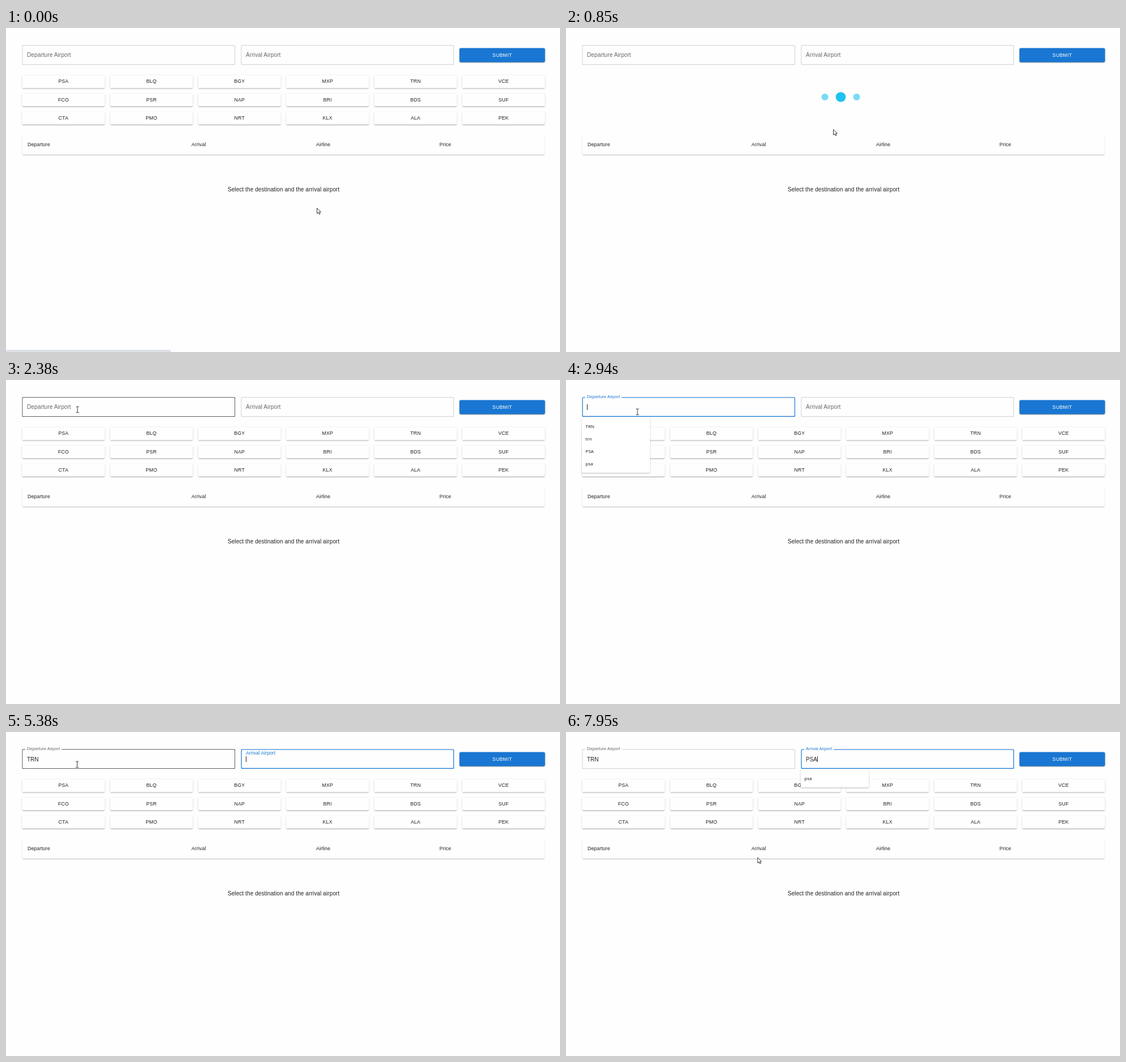
Animation, 977 px wide and 573 px high, one loop 8000 ms. Source, as an HTML page:

```html
<!DOCTYPE html>
<html lang="en">
<head>
<meta charset="utf-8">
<title>Flight search</title>
<style>
  html, body { margin: 0; width: 100%; height: 100%; overflow: hidden; background: #fefefe; }
  body { position: relative; font-family: "Liberation Sans", Arial, sans-serif; color: rgba(0,0,0,.87); }
  div, svg { position: absolute; box-sizing: border-box; }
  #page { inset: 0; }
  .text { line-height: 20px; white-space: pre; }
  .btn {
    height: 22.8px; border-radius: 2.5px; background: #fefefe;
    font-size: 8.75px; line-height: 23px; letter-spacing: .02857em; text-align: center;
    box-shadow: 0 1.9px .6px -1.25px rgba(0,0,0,.2), 0 1.25px 1.25px rgba(0,0,0,.14), 0 .6px 3.1px rgba(0,0,0,.12);
  }
  .submit { height: 25px; line-height: 25px; background: #1976d2; color: #fff; }
  .table {
    width: 922.3px; height: 36px; border-radius: 2.5px; background: #fefefe;
    box-shadow: 0 1.25px .6px -.6px rgba(0,0,0,.2), 0 .6px .6px rgba(0,0,0,.14), 0 .6px 1.9px rgba(0,0,0,.12);
  }
  .head { top: 196px; font-size: 8.75px; letter-spacing: .01071em; }
  .message { left: 0; top: 276px; width: 979px; text-align: center; font-size: 10px; letter-spacing: .00938em; }
  .frame { height: 34.8px; border-radius: 2.5px; }
  .label { padding: 0 3px; letter-spacing: .00938em; white-space: pre; transform: translateY(-50%); line-height: 1; }
  .value { top: 38px; height: 20px; display: flex; align-items: center; font-size: 10px; white-space: pre; }
  .value i { width: 1px; height: 10px; margin-right: -1px; background: #222; }
  .list {
    top: 66px; width: 119.5px; padding: 5px 6.3px; border-radius: 1px; background: #fff;
    font: 8px/22px "Open Sans", "Noto Sans", sans-serif; color: #111; white-space: pre-line;
    box-shadow: 0 1px 2.5px rgba(0,0,0,.28);
  }
  #status { left: -3px; top: 569px; width: 294px; height: 8px; border-radius: 3px; background: #dee1e6; }
  svg { left: 0; top: 0; overflow: visible; }
</style>
</head>
<body>
<div id="page"></div>
<div id="status"></div>
<svg id="cursor" width="20" height="20" fill="#fff" stroke="#222" stroke-width=".9" stroke-linejoin="round">
  <path data-kind="arrow" d="M.5.5V10.2L2.8 8.2L4.4 11.6L6 10.9L4.5 7.6H7.3Z"/>
  <path data-kind="hand" d="M2.6 9V1.6a1.1 1.1 0 0 1 2.2 0V5.2q1.2-.7 1.9.3q1.2-.5 1.8.5q1.5-.3 1.5 1.3V10.5q0 1.8-1.2 3V15H3.8V13.7L.4 9.5Q-.3 8 1.2 7.7Z"/>
  <path data-kind="beam" fill="none" d="M-2.5-5H-1Q0-5 0-4Q0-5 1-5H2.5M0-4V4.500M-2.5 5.5H-1Q0 5.5 0 4.5Q0 5.5 1 5.5H2.5"/>
</svg>
<script>
const LOOP = 8000;
const LEFT = 28.3;
const page = document.getElementById('page');
const status = document.getElementById('status');
const cursor = document.getElementById('cursor');

function add(parent, cls, style = {}, text = '') {
  const el = document.createElement('div');
  el.className = cls;
  el.textContent = text;
  Object.assign(el.style, style);
  parent.append(el);
  return el;
}
const px = n => n + 'px';
const show = (el, on) => { el.style.display = on ? '' : 'none'; };
// A transform keeps fractional edges soft instead of snapping them
const move = (x, y) => `translate(${x}px, ${y}px)`;
const box = (x, y, width) => ({ left: 0, top: 0, width: px(width), transform: move(x, y) });

// Static layout
const airports = 'PSA BLQ BGY MXP TRN VCE FCO PSR NAP BRI BDS SUF CTA PMO NRT KLX ALA PEK'.split(' ');
const grid = add(page, 'grid');
airports.forEach((code, i) =>
  add(grid, 'btn', box(LEFT + i % 6 * 155.25, 83.4 + Math.floor(i / 6) * 32.2, 146), code));
add(page, 'btn submit', box(799.6, 35.5, 151), 'SUBMIT');
add(page, 'table', box(LEFT, 188, 922.3));
[['Departure', 38], ['Arrival', 327], ['Airline', 547], ['Price', 764.5]].forEach(([name, x]) =>
  add(page, 'text head', { left: px(x) }, name));
add(page, 'text message', {}, 'Select the destination and the arrival airport');

// Three pulsing dots
const loader = add(page, 'loader');
loader.innerHTML = '<svg width="977" height="200" fill="#10bff0">' +
  [456.5, 484.5, 512.5].map(x => `<circle cx="${x}" cy="122"/>`).join('') + '</svg>';
const dots = [...loader.querySelectorAll('circle')];

function drawLoader(t) {
  const phase = ((t - 400) / 800 % 1 + 1) % 1;
  const low = 1 - Math.abs(2 * phase - 1);
  dots.forEach((dot, i) => {
    const k = i === 1 ? low : 1 - low;
    dot.setAttribute('r', (9 + 6 * k) * .622);
    dot.setAttribute('opacity', .5 + .5 * k);
  });
}

function makeField(x, width, name) {
  const frame = add(page, 'frame', box(x, 30.2, width));
  const label = add(page, 'label', { left: px(x + 5.7) }, name);
  const value = add(page, 'value', { left: px(x + 8.7) });
  const text = document.createElement('span');
  const caret = document.createElement('i');
  value.append(text, caret);
  const list = add(page, 'list', { left: px(x) });

  return s => {
    const edge = s.focus ? '#1976d2' : s.hover ? '#333' : '#c4c4c4';
    frame.style.boxShadow = `inset 0 0 0 ${s.focus ? 1.4 : 1}px ${edge}`;
    label.style.top = px(47.5 - 17.3 * s.float);
    label.style.fontSize = px(10 - 2.5 * s.float);
    label.style.color = s.focus ? '#1976d2' : 'rgba(0,0,0,.6)';
    label.style.background = s.float ? '#fefefe' : 'none';
    text.textContent = s.value;
    show(caret, s.caret);
    show(list, s.list);
    list.textContent = s.list.split(' ').join('\n');
  };
}
const drawDeparture = makeField(LEFT, 376.4, 'Departure Airport');
const drawArrival = makeField(414.3, 375.6, 'Arrival Airport');

// Steps: time, pointer x, y, kind, then what changes on the page, departure and arrival
const blank = { focus: 0, hover: 0, float: 0, value: '', caret: 0, list: '' };
const steps = [
  [0, 548, 318, 'arrow', { status: 1, page: 1, wait: 0 }, blank, blank],
  [290, 540, 300, 'arrow', { page: 0 }],
  [430, 520, 262, 'arrow', { page: 1, wait: 1, status: 0 }],
  [570, 500, 226, 'arrow'],
  [710, 483, 198, 'arrow'],
  [850, 471, 179, 'arrow'],
  [980, 268, 152, 'arrow'],
  [1110, 116, 131, 'hand', { wait: 0 }],
  [1390, 101, 130, 'hand'],
  [1540, 97, 129, 'hand'],
  [1690, 97, 126, 'hand'],
  [1820, 99, 118, 'hand'],
  [1960, 104, 98, 'hand'],
  [2100, 114, 72, 'arrow'],
  [2240, 123, 58, 'beam', {}, { hover: 1 }],
  [2380, 126, 52, 'beam'],
  [2660, 126, 55, 'beam', {}, { focus: 1, float: .6, caret: 1 }],
  [2800, 126, 56, 'beam', {}, { float: 1 }],
  [2940, 126, 56, 'beam', {}, { list: 'TRN trn PSA psa' }],
  [3370, 125.5, 57, 'beam', {}, { caret: 0 }],
  [3800, 125.5, 57, 'beam', {}, { caret: 1 }],
  [4240, 125.5, 57, 'beam', {}, { value: 'T', list: 'TRN trn' }],
  [4390, 125.5, 57, 'beam', {}, { value: 'TR' }],
  [4800, 125.5, 57, 'beam', {}, { value: 'TRN' }],
  [5380, 125.5, 57, 'beam', {}, { focus: 0, caret: 0, list: '' }, { focus: 1, float: .6, caret: 1 }],
  [5530, 125.5, 57, 'beam', {}, {}, { float: 1, list: 'psa trn' }],
  [5930, 125.5, 57, 'beam', {}, {}, { caret: 0 }],
  [6340, 125.5, 57, 'beam', {}, {}, { value: 'P', caret: 1, list: 'psa' }],
  [6650, 125.5, 57, 'beam', {}, {}, { value: 'PS' }],
  [6920, 125.5, 57, 'beam', {}, {}, { value: 'PSA' }],
  [7350, 125.5, 57, 'beam', {}, {}, { caret: 0 }],
  [7500, 177, 86, 'arrow', {}, { hover: 0 }],
  [7650, 232, 124, 'hand'],
  [7800, 296, 179, 'arrow'],
  [7950, 337.5, 221.5, 'arrow', {}, {}, { caret: 1 }]
];

// Each state carries over what came before it
let last = [{}, {}, {}];
const states = steps.map(([time, x, y, kind, ...changes]) => {
  last = last.map((part, i) => ({ ...part, ...changes[i] }));
  return { time, x, y, kind, parts: last };
});

function draw(t) {
  const { time, x, y, kind, parts } = states.findLast(s => s.time <= t);
  const [view, departure, arrival] = parts;
  show(page, view.page);
  show(status, view.status);
  show(grid, !view.wait);
  show(loader, view.wait);
  drawLoader(time);
  drawDeparture(departure);
  drawArrival(arrival);
  cursor.style.transform = move(x, y);
  for (const shape of cursor.children) show(shape, shape.dataset.kind === kind);
}

const start = performance.now();
function tick() {
  draw((performance.now() - start) % LOOP);
  requestAnimationFrame(tick);
}
tick();
</script>
</body>
</html>
```
